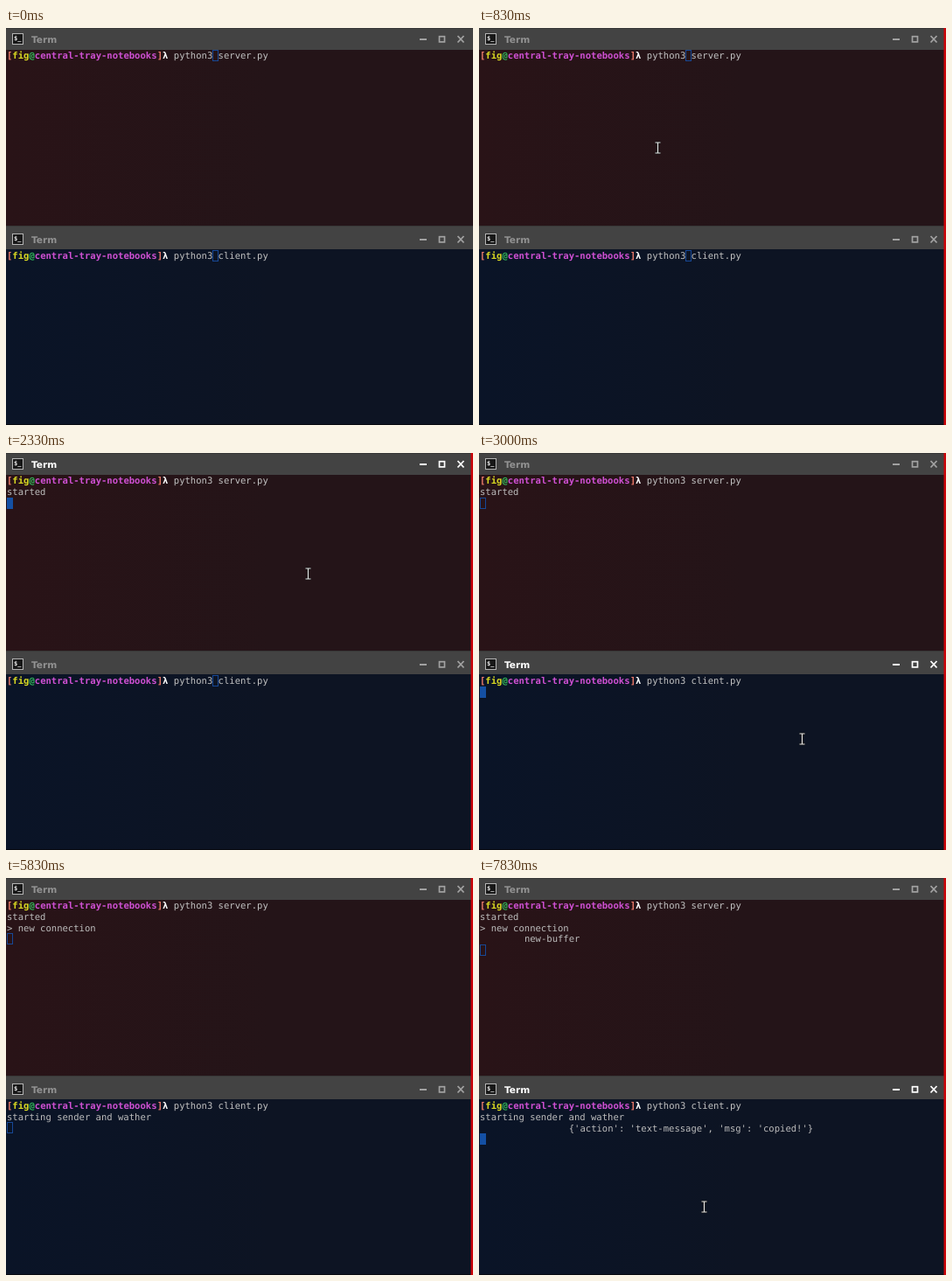
Animation of 534x454 px, one loop 8 s. Source, as an HTML page with a canvas:

```html
<!DOCTYPE html>
<html lang="en">
<head>
<meta charset="utf-8">
<title>Two terminals</title>
<style>
  html, body { margin: 0; width: 100%; height: 100%; overflow: hidden; background: #000; }
  canvas { display: block; width: 534px; height: 454px; }
</style>
</head>
<body>
<canvas id="stage" width="534" height="454"></canvas>
<script>
const W = 534, H = 454, LOOP = 8000;
const CELL = 6.36, LINE = 12.75;
const MONO = '10.56px "DejaVu Sans Mono", monospace';
const TITLE = 'bold 10.6px "DejaVu Sans", sans-serif';
const ctx = document.getElementById('stage').getContext('2d');
ctx.textRendering = 'geometricPrecision';

// Each track holds [start time, value]; a value stays until the next one.
const focus = [[0, ''], [1000, 'server'], [2830, 'client'], [5830, ''], [7670, 'client']];
const pointer = [
  [0, null], [670, [192, 136]], [830, [204, 137]], [1000, [211, 138]], [1170, [214, 138]],
  [1330, [289, 111]], [1500, [340, 89]], [2170, [341, 98]], [2330, [345, 138]],
  [2500, [352, 210]], [2670, [362, 290]], [2830, [369, 327]], [4330, null], [7500, [257, 376]]
];

const terminals = [
  {
    name: 'server', top: 0, barTop: 0, textTop: 25, bottom: 226,
    shades: ['#291317', '#241418'], enter: 1830,
    lines: [[2000, 0, 'started'], [3330, 0, '> new connection'], [6330, 8, 'new-buffer']]
  },
  {
    name: 'client', top: 228.6, barTop: 226, textTop: 253.8, bottom: 453,
    shades: ['#0a1427', '#0d1423'], enter: 3000,
    lines: [[3500, 0, 'starting sender and wather'],
            [6500, 16, "{'action': 'text-message', 'msg': 'copied!'}"]]
  }
];

const prompt = [
  ['[', '#f07c6c'], ['fig', '#dada22'], ['@', '#32bd5c'],
  ['central-tray-notebooks', '#cf50d3'], [']', '#f07c6c'], ['λ', '#ffffff']
];

function at(track, t) {
  let value = track[0][1];
  for (const [start, next] of track) if (t >= start) value = next;
  return value;
}

function rect(x, y, w, h, color) {
  ctx.fillStyle = color;
  ctx.fillRect(x, y, w, h);
}

function path(points, color, width) {
  ctx.strokeStyle = color;
  ctx.lineWidth = width;
  ctx.beginPath();
  for (const [x1, y1, x2, y2] of points) {
    ctx.moveTo(x1, y1);
    ctx.lineTo(x2, y2);
  }
  ctx.stroke();
}

function write(term, col, row, text, color, bold) {
  ctx.font = (bold ? 'bold ' : '') + MONO;
  ctx.fillStyle = color;
  ctx.fillText(text, 1 + col * CELL, term.textTop + 10.2 + row * LINE);
}

function drawBar(term, active) {
  const y = Math.round(term.top);
  rect(0, term.barTop, W, Math.floor(term.textTop) - term.barTop, '#434343');
  rect(0, term.barTop, W, 1, '#373737');

  rect(7, y + 6, 13, 13, '#b5b5b5');
  rect(8, y + 7, 11, 11, '#171717');
  ctx.font = 'bold 7px "DejaVu Sans Mono", monospace';
  ctx.fillStyle = '#eeeeee';
  ctx.fillText('$_', 9, y + 14);

  ctx.font = TITLE;
  ctx.fillStyle = active ? '#ffffff' : '#929292';
  ctx.fillText('Term', 29, y + 16.6);

  const color = active ? '#ffffff' : '#a2a2a2';
  rect(473, y + 12, 8, 2, color);
  ctx.strokeStyle = color;
  ctx.lineWidth = 1.7;
  ctx.strokeRect(495.5, y + 9.7, 6, 6.2);
  path([[516.5, y + 9, 523.5, y + 16.5], [523.5, y + 9, 516.5, y + 16.5]], color, 1.8);
}

function drawCursor(term, col, row, active) {
  const x = Math.round(col * CELL + 0.6);
  const y = Math.round(term.textTop + row * LINE);
  if (active) {
    rect(x, y, 7, 13, '#1450a4');
  } else {
    ctx.strokeStyle = '#174896';
    ctx.lineWidth = 1;
    ctx.strokeRect(x + 0.5, y + 0.5, 6, 12);
  }
}

function drawTerminal(term, t) {
  const active = at(focus, t) === term.name;
  const y = Math.floor(term.textTop);
  const fill = ctx.createLinearGradient(0, 0, 300, 0);
  term.shades.forEach((shade, i) => fill.addColorStop(i, shade));
  rect(0, y, W, term.bottom - y, fill);
  drawBar(term, active);

  const entered = t >= term.enter;
  const shown = term.lines.filter(([start]) => t >= start);
  drawCursor(term, entered ? 0 : 37, entered ? shown.length + 1 : 0, active);

  let col = 0;
  for (const [text, color] of prompt) {
    write(term, col, 0, text, color, true);
    col += text.length;
  }
  write(term, col + 1, 0, 'python3 ' + term.name + '.py', '#c2c2c2');
  shown.forEach(([, indent, text], i) => write(term, indent, i + 1, text, '#bdbdbd'));
}

function drawPointer([x, y]) {
  const beam = [
    [x + 0.5, y - 5.5, x + 0.5, y + 5.5],
    [x - 2.5, y - 6, x + 3.5, y - 6],
    [x - 2.5, y + 6, x + 3.5, y + 6]
  ];
  path(beam, '#101010', 2.6);
  path(beam, '#e6e6e6', 1.2);
}

function draw(t) {
  rect(0, 0, W, H, '#07090f');
  terminals.forEach(term => drawTerminal(term, t));
  if (t >= 170) rect(531.5, 0, 2.5, H, '#cc0408');
  const spot = at(pointer, t);
  if (spot) drawPointer(spot);
}

function tick() {
  draw(performance.now() % LOOP);
  requestAnimationFrame(tick);
}
tick();
</script>
</body>
</html>
```
